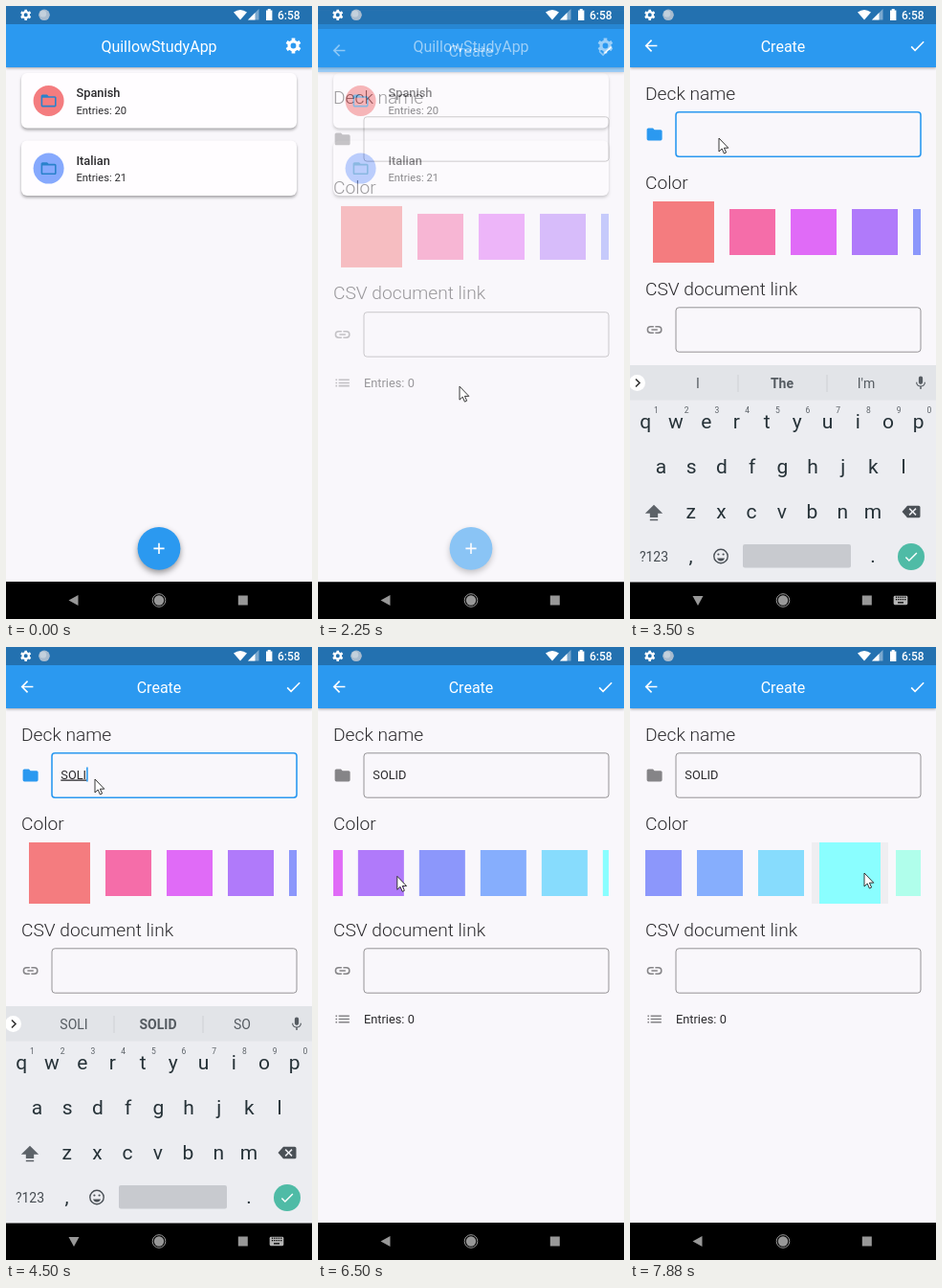
Animation, 320 px wide and 640 px high, one loop 8 s. Source, as an HTML page:

```html
<!DOCTYPE html>
<html lang="en">
<head>
<meta charset="utf-8">
<title>Flashcard decks</title>
<style>
  html, body { margin: 0; width: 100%; height: 100%; overflow: hidden; background: #000; }
  svg { display: block; width: 100%; height: 100%; }
  text { font-family: Roboto, sans-serif; fill: #2c2b2e; white-space: pre; }
  .mid { text-anchor: middle; }
  .bar { filter: drop-shadow(0 1.5px 1.5px #0005); }
  .card { fill: #fffdff; filter: drop-shadow(0 2px 1.5px #0005); }
  .fab { fill: #2b99f0; filter: drop-shadow(0 3px 3px #0006); }
  .head { font-size: 19.2px; font-weight: 300; }
  .key { font-size: 21px; fill: #263238; }
  .field { fill: none; stroke: #959396; }
</style>
</head>
<body>
<svg id="stage" viewBox="0 0 320 640"></svg>
<script>
const BLUE = '#2b99f0', GREY = '#858487', BODY = '#f9f7fb';
const SWATCHES = ['#f47c7f', '#f56da9', '#e06bf7', '#b07afa', '#8c97fb', '#86aefd', '#87dcfd', '#8afeff', '#b0feeb'];
const PICKED = 7;

// Icons on a 24 unit grid
const ICONS = {
  folder: 'M10 4H4c-1.1 0-2 .9-2 2v12c0 1.1.9 2 2 2h16c1.1 0 2-.9 2-2V8c0-1.1-.9-2-2-2h-8z',
  outline: 'M20 6h-8l-2-2H4c-1.1 0-2 .9-2 2v12c0 1.1.9 2 2 2h16c1.1 0 2-.9 2-2V8c0-1.1-.9-2-2-2zm0 12H4V8h16z',
  back: 'M20 11H7.8l5.6-5.6L12 4l-8 8 8 8 1.4-1.4L7.8 13H20z',
  check: 'M9 16.2 4.8 12l-1.4 1.4L9 19 21 7l-1.4-1.4z',
  add: 'M19 13h-6v6h-2v-6H5v-2h6V5h2v6h6z',
  link: 'M3.9 12A3.1 3.1 0 0 1 7 8.9h4V7H7a5 5 0 0 0 0 10h4v-1.9H7A3.1 3.1 0 0 1 3.9 12zM8 13h8v-2H8zm9-6h-4v1.9h4a3.1 3.1 0 0 1 0 6.2h-4V17h4a5 5 0 0 0 0-10z',
  list: 'M3 13h2v-2H3zm0 4h2v-2H3zm0-8h2V7H3zm4 4h14v-2H7zm0 4h14v-2H7zM7 7v2h14V7z',
  shift: 'M12 2 1 13h6v5h10v-5h6zM7 20v2h10v-2z',
  erase: 'M7 4H22a2 2 0 0 1 2 2V18a2 2 0 0 1-2 2H7L0 12zM19 8.400 17.600 7 14 10.600 10.400 7 9 8.400 12.600 12 9 15.600 10.400 17 14 13.400 17.600 17 19 15.600 15.400 12z',
  mic: 'M12 14a3 3 0 0 0 3-3V5a3 3 0 0 0-6 0v6a3 3 0 0 0 3 3zm5.300-3a5.300 5.300 0 0 1-10.600 0H5a7 7 0 0 0 6 6.700V21h2v-3.300A7 7 0 0 0 19 11z',
  keyboard: 'M3 5h18a2 2 0 0 1 2 2v10a2 2 0 0 1-2 2H3a2 2 0 0 1-2-2V7a2 2 0 0 1 2-2z'
};

const text = (x, y, str, size, attrs = '') => `<text x="${x}" y="${y}" font-size="${size}" ${attrs}>${str}</text>`;
const rect = (x, y, w, h, fill, attrs = '') => `<rect x="${x}" y="${y}" width="${w}" height="${h}" fill="${fill}" ${attrs}/>`;
const circle = (x, y, r, fill, attrs = '') => `<circle cx="${x}" cy="${y}" r="${r}" fill="${fill}" ${attrs}/>`;
const place = (x, y, size) => `transform="translate(${x - size / 2} ${y - size / 2}) scale(${size / 24})"`;
const icon = (name, x, y, fill, size = 19.2, attrs = '') =>
  `<path d="${ICONS[name]}" ${place(x, y, size)} fill="${fill}" ${attrs}/>`;

function gear(x, y, size) {
  const teeth = [0, 60, 120].map(a => `<path d="M9.700 2h4.600v4h-4.600zm0 16h4.600v4h-4.600z" transform="rotate(${a} 12 12)"/>`);
  return `<g ${place(x, y, size)} fill="#fff"><circle cx="12" cy="12" r="5.600" fill="none" stroke="#fff" stroke-width="4"/>${teeth.join('')}</g>`;
}

const appBar = title =>
  rect(0, 0, 320, 601, BODY) + rect(0, 0, 320, 64, BLUE, 'class="bar"') + rect(0, 0, 320, 19, '#2371b0') +
  text(160, 48, title, 16, 'class="mid" style="fill:#fff"');

const deckCard = (y, name, count, color) =>
  rect(16, y, 288, 57.5, '#fff', 'rx="6" class="card"') + circle(44.6, y + 29, 16, color) +
  icon('outline', 44.6, y + 29, '#2a82cb') +
  text(73.5, y + 25, name, 12.8, 'font-weight="500"') + text(73.5, y + 42.5, `Entries: ${count}`, 11.2);

const home = () => appBar('QuillowStudyApp') + gear(300.5, 41.5, 19.2) +
  deckCard(70, 'Spanish', 20, '#f47c7f') + deckCard(140.6, 'Italian', 21, '#86a9fd') +
  circle(160, 566.4, 22.4, BLUE, 'class="fab"') + circle(160, 566.4, 0, '#fff', 'id="ripple"') +
  icon('add', 160, 566.4, '#fff');

const field = (y, id) => rect(48, y, 256, 46.4, 'none', `rx="3.2" class="field" id="${id}"`);

const create = () => appBar('Create') + icon('back', 22, 41.5, '#fff') + icon('check', 300.5, 41.8, '#fff') +
  text(16, 97.5, 'Deck name', 19.2, 'class="head"') +
  text(16, 191, 'Color', 19.2, 'class="head"') +
  text(16, 301.5, 'CSV document link', 19.2, 'class="head"') +
  icon('folder', 25.6, 134, GREY, 19.2, 'id="folder"') + field(110.8, 'nameField') +
  text(57.3, 137.5, '', 12.8, 'id="name"') + rect(0, 125.5, 1.6, 15, BLUE, 'id="caret"') +
  `<g clip-path="url(#stripClip)">${rect(0, 204, 80, 64, '#efeef1', 'id="ink"')}${SWATCHES.map(c => rect(0, 212, 48, 48, c, 'class="swatch"')).join('')}</g>` +
  icon('link', 25.6, 338, GREY) + field(314.8, 'linkField') +
  icon('list', 25.6, 388.5, GREY) + text(48, 393.3, 'Entries: 0', 12.8);

function keyRow(letters, x, y) {
  return [...letters].map((c, i) => text(x + i * 31.7, y, c, 21, 'class="mid key"')).join('');
}

function keyboard() {
  const digits = [...'1234567890'].map((d, i) => text(27.5 + i * 31.7, 425, d, 8.5, 'class="mid" style="fill:#5c6268"'));
  const words = [71, 159, 247].map((x, i) =>
    text(x, 399, '', 14, `class="mid word" style="fill:#555b61" font-weight="${i === 1 ? 700 : 400}"`));
  return rect(0, 375, 320, 227, '#ecedf1') + rect(0, 375, 320, 36.5, '#e2e4e8') +
    circle(7.5, 393.5, 8.5, '#fff') + '<path d="M6 389.500l4 4-4 4" fill="none" stroke="#333" stroke-width="1.600"/>' +
    rect(112.5, 385, 1, 18, '#cdd0d4') + rect(205.5, 385, 1, 18, '#cdd0d4') + words.join('') +
    icon('mic', 304, 393.5, '#555b61', 17) +
    keyRow('qwertyuiop', 16.3, 441) + digits.join('') +
    keyRow('asdfghjkl', 32.5, 487.5) + keyRow('zxcvbnm', 63.7, 535) +
    icon('shift', 25, 529, '#5c6268', 20) + icon('erase', 294, 528, '#4a5056', 19) +
    text(25, 580, '?123', 14, 'class="mid" style="fill:#454b51"') +
    text(63.5, 581, ',', 21, 'class="mid key"') + text(254, 581, '.', 21, 'class="mid key"') +
    circle(95, 574.5, 7.2, 'none', 'stroke="#4a5056" stroke-width="1.4"') +
    circle(92.4, 572.5, 1.1, '#4a5056') + circle(97.6, 572.5, 1.1, '#4a5056') +
    '<path d="M91 576.500h8q-1 3-4 3t-4-3z" fill="#4a5056"/>' +
    rect(118, 562, 113, 24.5, '#c8cacf', 'rx="2"') +
    circle(294, 575, 14, '#4fbba6') + icon('check', 294, 575, '#fff', 17);
}

const statusBar = () => gear(20.7, 9.3, 13.5) + circle(40, 9.3, 5.8, '#a9bccf') + circle(38.8, 8.2, 3.4, '#c3d0dc') +
  '<path d="M245 14.500 238 6.500q7-5 14 0z" fill="#fff"/>' +
  '<path d="M253 14.500h11.500V3z" fill="#fff" opacity=".4"/><path d="M253 14.500h7.500V7z" fill="#fff"/>' +
  '<path d="M272 4.500h1.700V3h3v1.500h1.700V15H272z" fill="#fff"/>' +
  text(284, 13.6, '6:58', 12, 'font-weight="500" style="fill:#fff"');

function navBar() {
  let dots = '';
  for (let row = 0; row < 2; row++)
    for (let i = 0; i < 5; i++) dots += rect(277.9 + i * 2.3, 616.6 + row * 2.4, 1.3, 1.3, '#000');
  return rect(0, 601.5, 320, 38.5, '#000') +
    '<path id="navBack" d="M65.500 620.500l10-5.500v11z" fill="#989898"/>' +
    circle(160, 620.5, 5.2, '#989898') + circle(160, 620.5, 6.8, 'none', 'stroke="#989898"') +
    rect(242.8, 615.5, 10, 10, '#989898') +
    `<g id="navKeys">${icon('keyboard', 283, 620.5, '#b5b5b5', 16)}${dots}${rect(280, 622.2, 6, 1.3, '#000')}</g>`;
}

const stage = document.getElementById('stage');
stage.innerHTML = `<defs><clipPath id="stripClip">${rect(16, 200, 288, 72, '#000')}</clipPath></defs>
  <g>${home()}</g><g id="create">${create()}</g><g id="keyboard">${keyboard()}</g>
  ${statusBar()}${navBar()}
  <path id="pointer" d="M0 0V14L3.200 11 5.400 16 7.600 15 5.400 10.200H9.800Z" fill="#fff" stroke="#222" stroke-width=".9"/>`;

const $ = id => document.getElementById(id);
const swatches = stage.querySelectorAll('.swatch'), words = stage.querySelectorAll('.word');
const set = (el, attrs) => { for (const k in attrs) el.setAttribute(k, attrs[k]); };
const show = (el, on) => set(el, { display: on ? 'inline' : 'none' });

const LOOP = 8000;
const POINTER = [ // time, x, y
  [1150, 180, 640], [1330, 173, 574], [1600, 172, 571], [1980, 172, 571], [2600, 113, 143], [2950, 113, 143],
  [3250, 93, 138], [4720, 93, 138], [5080, 290, 619], [5200, 294, 577], [5240, 294, 577], [5750, 297, 280],
  [6050, 290, 241], [6650, 45, 239], [6850, 50, 240], [7500, 245, 236], [LOOP, 245, 236]
];
const TYPED = [ // time, text, suggestions
  [0, '', ['I', 'The', "I'm"]],
  [3900, 'S', ['S', 'SO', 'SHE']],
  [4120, 'SO', ['SO', 'SOME', 'SOON']],
  [4300, 'SOL', ['SOL', 'SOLD', 'SO']],
  [4450, 'SOLI', ['SOLI', 'SOLID', 'SO']],
  [4680, 'SOLID', ['SOLIDS', 'SOLID', 'SOLIDLY']]
];

const progress = (t, from, to) => Math.min(1, Math.max(0, (t - from) / (to - from)));
const smooth = u => u * u * (3 - 2 * u);
const easeOut = u => 1 - (1 - u) ** 3;

function pointerAt(t) {
  const i = Math.max(1, POINTER.findIndex(p => p[0] > t));
  const [t0, x0, y0] = POINTER[i - 1], [t1, x1, y1] = POINTER[i];
  const u = smooth(progress(t, t0, t1));
  return [x0 + (x1 - x0) * u, y0 + (y1 - y0) * u];
}

// The strip follows the drag, then coasts after release.
function scrollAt(t) {
  const RELEASE = 6500, drag = 273 - pointerAt(Math.min(t, RELEASE))[0];
  if (t < 6050) return 0;
  return Math.max(0, drag) + (290 - drag) * easeOut(progress(t, RELEASE, 7200));
}

function drawStrip(t) {
  const scroll = scrollAt(t), selected = t >= 7750 ? PICKED : 0;
  swatches.forEach((el, i) => {
    const slot = 16 + i * 64 + (i > 0 ? 16 : 0) + (selected && i > selected ? 16 : 0) - scroll;
    const big = i === selected, side = big ? 64 : 48;
    set(el, { x: slot + 8, y: big ? 204 : 212, width: side, height: side });
    if (i === PICKED) set($('ink'), { x: slot });
  });
  show($('ink'), t >= 7750);
}

function drawName(t) {
  const focused = t >= 3000 && t < 5250;
  const [since, value, guesses] = TYPED.filter(k => k[0] <= t).pop();
  const name = $('name');
  name.textContent = value;
  set(name, { 'text-decoration': focused ? 'underline' : 'none' });
  guesses.forEach((word, i) => words[i].textContent = word);
  set($('folder'), { fill: focused ? BLUE : GREY });
  $('nameField').style.cssText = focused ? `stroke:${BLUE};stroke-width:1.6` : '';
  show($('caret'), focused && (t - Math.max(since, 3000)) % 1000 < 500);
  set($('caret'), { x: 57.3 + (value ? name.getComputedTextLength() : 0) });
}

function draw(t) {
  const tap = progress(t, 1820, 2120);
  set($('ripple'), { r: 22.4 * easeOut(tap), opacity: .25 * (1 - tap) });

  const open = progress(t, 2020, 2360);
  show($('create'), open > 0);
  set($('create'), { opacity: open * open, transform: `translate(0 ${150 * (1 - easeOut(open))})` });

  const raised = easeOut(progress(t, 3080, 3330)) - smooth(progress(t, 5260, 5480));
  const keysUp = t >= 3200 && t < 5350;
  show($('keyboard'), raised > 0);
  set($('keyboard'), { transform: `translate(0 ${227 * (1 - raised)})` });
  set($('navBack'), { transform: keysUp ? 'rotate(-90 71 620.5)' : '' });
  show($('navKeys'), keysUp);

  drawName(t);
  drawStrip(t);
  show($('pointer'), t >= POINTER[0][0]);
  set($('pointer'), { transform: `translate(${pointerAt(t)})` });
}

const start = performance.now();
function tick() {
  draw((performance.now() - start) % LOOP);
  requestAnimationFrame(tick);
}
tick();
</script>
</body>
</html>
```
